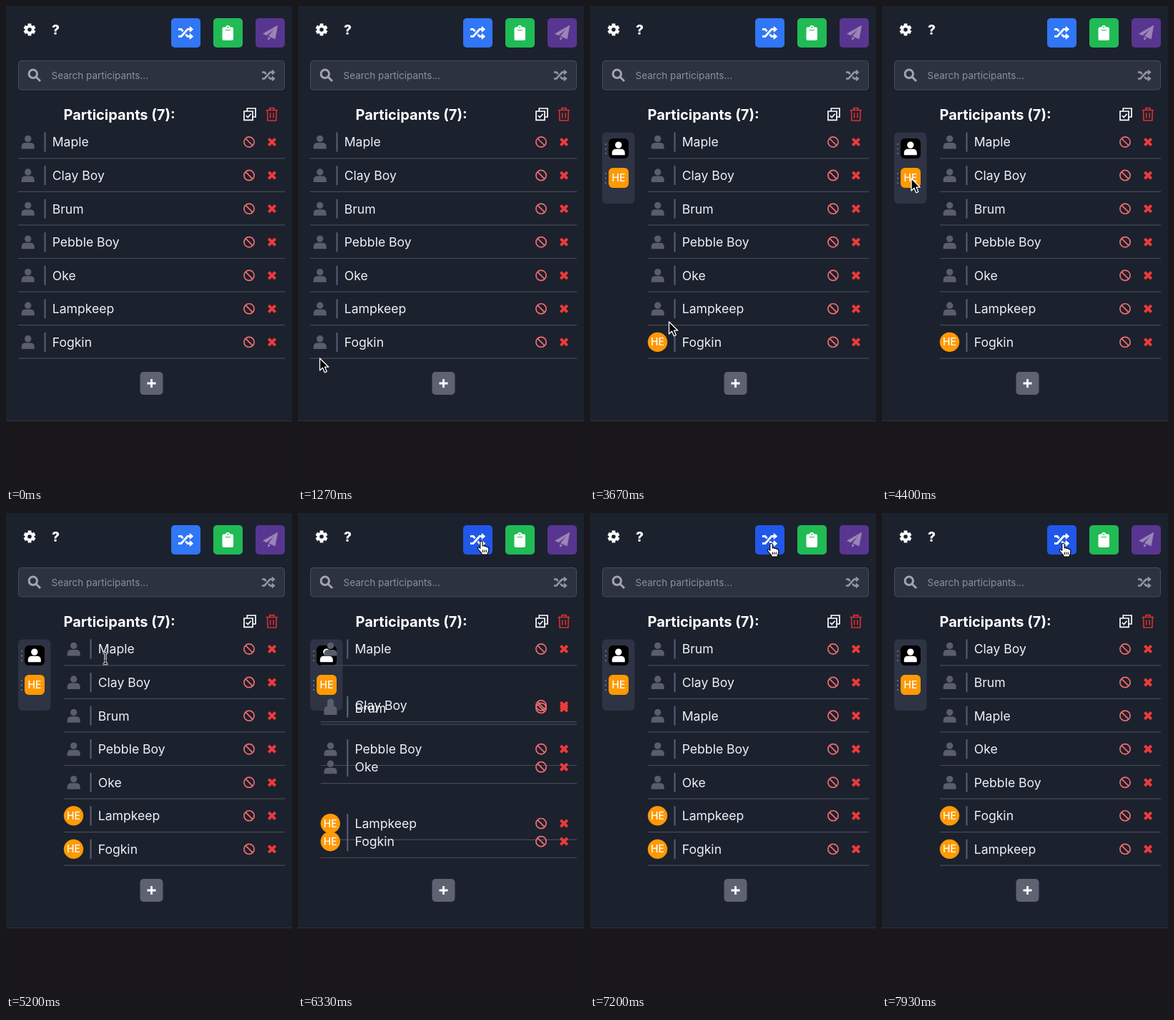
An HTML page for the animation above (8 s loop, 400 by 669 pixels).

```html
<!DOCTYPE html>
<html lang="en">
<head>
<meta charset="utf-8">
<title>Participants</title>
<style>
  html, body { margin: 0; width: 100%; height: 100%; overflow: hidden; background: #1c212e; }
  svg { display: block; width: 100%; height: 100%; font-family: Inter, "Open Sans", sans-serif; }
  .tag { font-size: 14px; font-weight: 500; fill: #fff; text-anchor: middle; }
  .name { font-size: 17.6px; fill: #eef0f4; }
  .line { fill: none; stroke: currentColor; }
</style>
</head>
<body>
<svg id="stage" viewBox="0 0 400 669">
  <defs>
    <g id="person" fill="currentColor">
      <circle cy="-4.6" r="4.7"/>
      <path d="M-9 9V6.5Q-9 1-3.5 1H3.5Q9 1 9 6.5V9Q9 9.5 8 9.5H-8Q-9 9.5-9 9Z"/>
    </g>
    <g id="shuffle">
      <path class="line" stroke-width="2.8" d="M-10.5 5H-6.5L2.5-5H6M-10.5-5H-6.5L-3.9-2.1M-.1 2.1L2.5 5H6"/>
      <path fill="currentColor" stroke="currentColor" stroke-linejoin="round" d="M5.7-8.8V-1.2L10.2-5ZM5.7 1.2V8.8L10.2 5Z"/>
    </g>
    <g id="dots" fill="#7b808d">
      <circle cy="-6.5" r="1"/><circle r="1"/><circle cy="6.5" r="1"/>
    </g>
    <g id="actions">
      <g class="line" color="#f06d6f" stroke-width="1.7">
        <circle cx="340" r="7.1"/><path d="M335-5L345 5"/>
      </g>
      <path class="line" color="#ec3a3b" stroke-width="4" d="M367.3-4.7L376.7 4.7M376.7-4.7L367.3 4.7"/>
    </g>
  </defs>

  <rect width="400" height="669" fill="#1c212e"/>
  <rect y="580" width="400" height="89" fill="#1a171a"/>
  <path d="M0 579.5H400" stroke="#2b323b"/>

  <g transform="translate(33 33)">
    <path stroke="#fff" stroke-width="4.8" d="M0-8.5V8.5M-7.3-4.2L7.3 4.2M-7.3 4.2L7.3-4.2"/>
    <circle r="6.5" fill="#fff"/><circle r="2.8" fill="#1c212e"/>
  </g>
  <text x="69.5" y="40" font-size="19" font-weight="800" fill="#fff" text-anchor="middle">?</text>

  <rect id="mixButton" x="231" y="17" width="41" height="41" rx="5"/>
  <use href="#shuffle" x="251.5" y="37.5" color="#fff"/>

  <rect x="290" y="17" width="41" height="41" rx="5" fill="#20bb54"/>
  <rect x="302.5" y="29.5" width="15.5" height="18.5" rx="2.2" fill="#fff"/>
  <circle cx="310.2" cy="30" r="3" fill="#fff"/>
  <circle cx="310.2" cy="30" r="1" fill="#20bb54"/>
  <path d="M306.5 33.7H314" stroke="#20bb54"/>

  <rect x="349" y="17" width="41" height="41" rx="5" fill="#583590"/>
  <path transform="translate(369.5 37.5)" fill="#9a86b6" stroke="#9a86b6" stroke-width=".6" stroke-linejoin="round"
    d="M10.3-10.3L-10 1.2L-5 3.4L6.3-6.3L-2 4.6L6.8 8.5ZM-3 6.2V10.2L.3 7.6Z"/>

  <rect x="17.5" y="76.5" width="372" height="40.5" rx="4" fill="#2d3240" stroke="#474c59"/>
  <g class="line" color="#a1a5ae" stroke-width="3">
    <circle cx="37.8" cy="94.8" r="5.7"/><path d="M42 99L48 105"/>
  </g>
  <text x="63.5" y="102" font-size="13.5" fill="#8b909c">Search participants...</text>
  <use href="#shuffle" transform="translate(367.2 97) scale(.88)" color="#9499a3"/>

  <text x="80.5" y="158.5" font-size="20" font-weight="700" fill="#fff">Participants (7):</text>
  <path class="line" color="#fff" stroke-width="1.7" d="M333 147H345V159.3H333ZM337.3 146.5V143H349V155H345.5M335.8 153L338.3 155.5L342.5 150.8"/>
  <path class="line" color="#d93032" stroke-width="1.6" d="M363.7 145.5H380M368.8 145V142.6H375V145M365.5 146L366 160H377.8L378.3 146M369.7 149.3V156.5M374.1 149.3V156.5"/>

  <g id="panel">
    <rect x="17" y="176.5" width="45.5" height="99.5" rx="6" fill="#2e3443"/>
    <use href="#dots" x="22" y="199.5"/><use href="#dots" x="22" y="240.5"/>
    <rect x="26" y="185" width="28" height="28" rx="6"/>
    <use href="#person" x="39.8" y="198.7" color="#fff"/>
    <rect x="26" y="226" width="28" height="28" rx="6" fill="#ff9a05"/>
    <text class="tag" x="40" y="245">HE</text>
  </g>

  <g id="rows"></g>

  <rect x="187.5" y="511" width="32" height="32" rx="5" fill="#5f6371"/>
  <path d="M197.5 527H209.5M203.5 521V533" stroke="#fff" stroke-width="2.8"/>

  <g id="cursor" stroke-linejoin="round">
    <path id="arrow" fill="#000" stroke="#fff" stroke-width="1.3" d="M0 0V17L4 13.3L6.8 19.8L9.8 18.5L7.1 12.2H12.3Z"/>
    <g id="beam" fill="none">
      <path stroke="#fff" stroke-width="3.2" d="M-3.5-8Q0-8 0-6V6Q0 8-3.5 8M3.5-8Q0-8 0-6V6Q0 8 3.5 8M-2 3H2"/>
      <path stroke="#000" stroke-width="1.2" d="M-3.5-8Q0-8 0-6V6Q0 8-3.5 8M3.5-8Q0-8 0-6V6Q0 8 3.5 8M-2 3H2"/>
    </g>
    <g id="hand">
      <path fill="#fff" stroke="#000" stroke-width="1.1" d="M-1.7 9.5V1Q-1.7-.8 0-.8T1.7 1V6Q4.2 4.8 4.8 6.8Q7.2 5.8 7.8 7.8Q10.2 7 10.3 9.5V12Q10 14.5 8.8 16V18H.2V16Q-2.5 13.5-5 9.8Q-5.7 7.8-4 7.7Q-2.8 8-1.7 9.5Z"/>
      <path stroke="#000" d="M2 11.5V15M4.4 11.5V15M6.8 11.5V15"/>
    </g>
  </g>
</svg>
<script>
const LOOP = 8000, FLIP = 350, ROW_TOP = 190, ROW_STEP = 46.57;
const LEFT_CLOSED = 17, LEFT_OPEN = 81, PANEL_AT = 1870;
const names = ["Maple", "Clay Boy", "Brum", "Pebble Boy", "Oke", "Lampkeep", "Fogkin"];
const taggedAt = { 6: 3450, 5: 4850 };

// Each order lists row indices from top to bottom.
const orders = [
  { at: 0, list: [0, 1, 2, 3, 4, 5, 6] },
  { at: 6222, list: [0, 2, 4, 3, 1, 6, 5] },
  { at: 6760, list: [2, 1, 0, 3, 4, 5, 6] },
  { at: 7340, list: [1, 2, 0, 4, 3, 6, 5] }
];

// time, x, y of the pointer tip
const path = [
  [0, -20, 515], [400, -20, 515], [900, 23, 500], [1270, 30.5, 492], [1700, 31, 470],
  [2050, 31, 470], [2700, 41, 241], [2900, 41, 241], [3420, 96, 466], [3670, 110.5, 441],
  [4200, 41, 241], [4400, 41, 241], [4820, 96, 424], [5200, 139, 203], [5550, 215, 70],
  [5780, 262, 4], [6050, 257, 40], [6330, 256.5, 40], [6700, 253.5, 43], [8000, 253.5, 43]
];

const $ = id => document.getElementById(id);
const smooth = u => { u = Math.min(1, Math.max(0, u)); return u * u * (3 - 2 * u); };
const mix = (a, b, u) => a + (b - a) * u;
const show = (el, on) => el.style.display = on ? "" : "none";
const move = (el, x, y) => el.setAttribute("transform", `translate(${x} ${y})`);

$("rows").innerHTML = names.map(name => `<g>
  <path class="edge" stroke="#454a56" stroke-width="1.2"/>
  <g class="lead">
    <use class="plain" href="#person" x="13.7" color="#5a5e6b"/>
    <g class="tagged"><circle cx="13.5" r="13.7" fill="#ff9a05"/><text class="tag" x="13.5" y="5">HE</text></g>
    <path d="M37.5-13.5V13.5" stroke="#566177" stroke-width="2"/>
    <text class="name" x="47.7" y="6.4">${name}</text>
  </g>
  <use href="#actions"/>
</g>`).join("");

const rows = [...$("rows").children].map(el => {
  const part = name => el.querySelector("." + name);
  return { el, edge: part("edge"), lead: part("lead"), plain: part("plain"), tagged: part("tagged") };
});

function drawRows(t) {
  const step = orders.findLastIndex(o => o.at <= t);
  const now = orders[step], before = orders[Math.max(0, step - 1)];
  const u = smooth((t - now.at) / FLIP);
  // The first shuffle slides in from where the rows stood before the panel opened.
  const left = t < PANEL_AT ? LEFT_CLOSED : step === 1 ? mix(LEFT_CLOSED, LEFT_OPEN, u) : LEFT_OPEN;
  rows.forEach((row, i) => {
    const slot = mix(before.list.indexOf(i), now.list.indexOf(i), u);
    const tagged = t >= taggedAt[i];
    move(row.el, 0, ROW_TOP + slot * ROW_STEP);
    move(row.lead, left, 0);
    row.edge.setAttribute("d", `M${left} 22.8H390`);
    show(row.plain, !tagged);
    show(row.tagged, tagged);
  });
}

function drawCursor(t) {
  const k = Math.max(1, path.findIndex(p => p[0] > t));
  const [t0, x0, y0] = path[k - 1], [t1, x1, y1] = path[k];
  const u = smooth((t - t0) / (t1 - t0));
  const x = mix(x0, x1, u), y = mix(y0, y1, u);
  const inside = (l, top, r, b) => x > l && x < r && y > top && y < b;
  const onButton = inside(231, 17, 272, 58);
  const onText = inside(122, 176, 325, 490) || inside(60, 77, 350, 117);
  move($("cursor"), x, y);
  show($("hand"), onButton);
  show($("beam"), onText);
  show($("arrow"), !onButton && !onText);
  $("mixButton").setAttribute("fill", onButton ? "#2258e9" : "#3076f5");
}

const start = performance.now();
function draw(now) {
  const t = Math.max(0, now - start) % LOOP;
  show($("panel"), t >= PANEL_AT);
  drawRows(t);
  drawCursor(t);
  requestAnimationFrame(draw);
}
draw(start);
</script>
</body>
</html>
```
